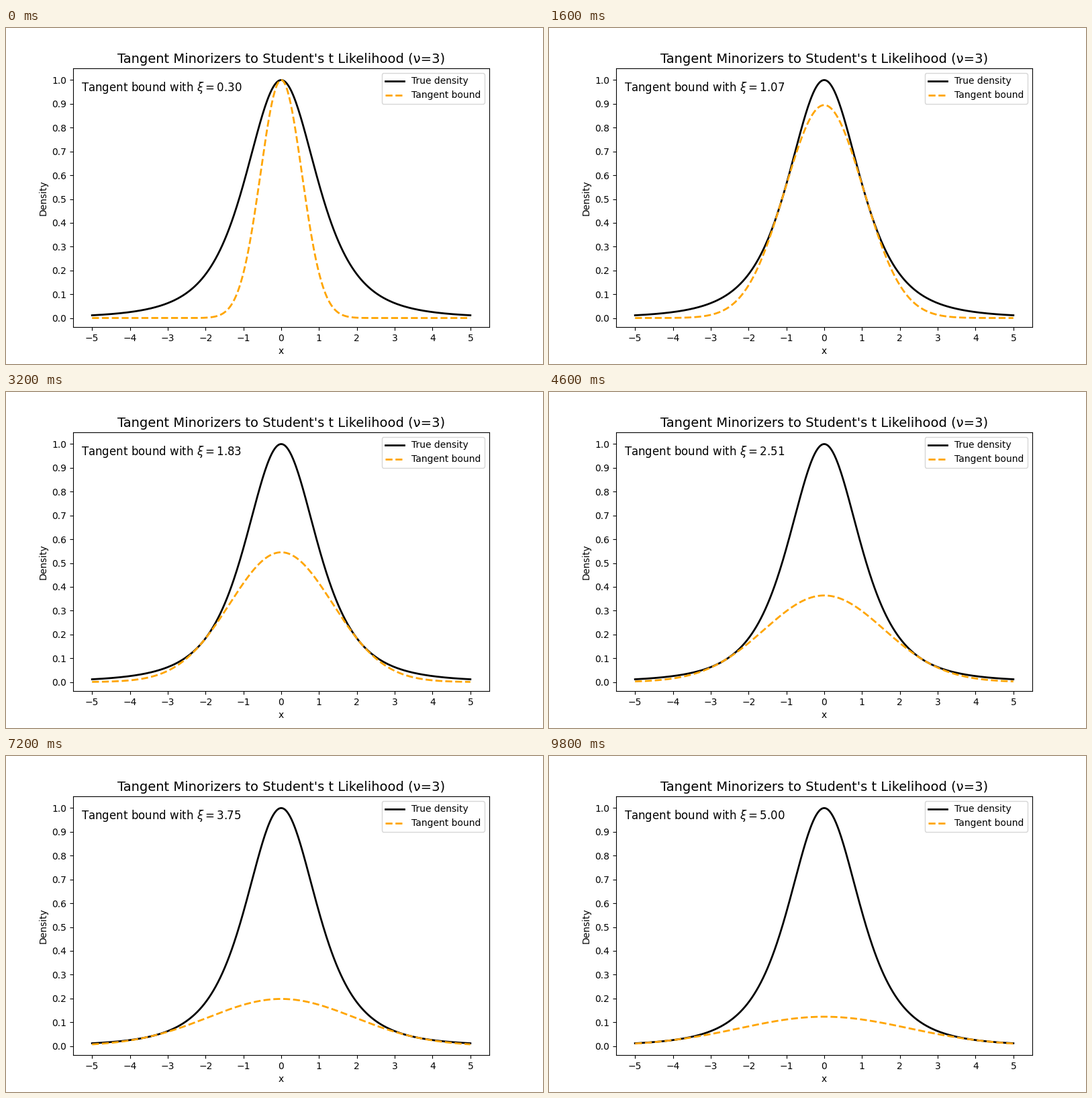
These frames come from a looping animation (800 by 500 pixels, 10000 ms). A matplotlib script:

```python
import numpy as np
import matplotlib.pyplot as plt
from matplotlib.animation import FuncAnimation

NU = 3
FRAMES = 50
INTERVAL = 200

x = np.linspace(-5, 5, 500)
xis = np.linspace(0.3, 5, FRAMES)


def density(sq):
    """Unnormalised Student's t density as a function of x squared."""
    return (1 + sq / NU) ** (-(NU + 1) / 2)


def tangent_bound(xi):
    """Gaussian minorizer with variance xi, touching the density from below."""
    touch = max((NU + 1) * xi - NU, 0)
    return density(touch) * np.exp(-(x**2 - touch) / (2 * xi))


fig, ax = plt.subplots(figsize=(8, 5), dpi=100)
ax.plot(x, density(x**2), color="black", lw=2, label="True density")
# Left empty so that only the density sets the axis limits.
(bound,) = ax.plot([], [], color="orange", ls="--", lw=2,
                   label="Tangent bound")
note = ax.text(0.02, 0.9526, "", transform=ax.transAxes, fontsize=12, va="top")

ax.set_title("Tangent Minorizers to Student's t Likelihood (ν=3)", fontsize=14)
ax.set_xlabel("x")
ax.set_ylabel("Density")
ax.set_xticks(np.arange(-5, 6))
ax.set_yticks(np.arange(11) / 10)
ax.legend(loc="upper right")


def update(i):
    xi = xis[i]
    bound.set_data(x, tangent_bound(xi))
    note.set_text(rf"Tangent bound with $\xi = {xi:.2f}$")
    return bound, note


anim = FuncAnimation(fig, update, frames=FRAMES, interval=INTERVAL,
                     repeat=True, repeat_delay=0)
plt.show()
```
